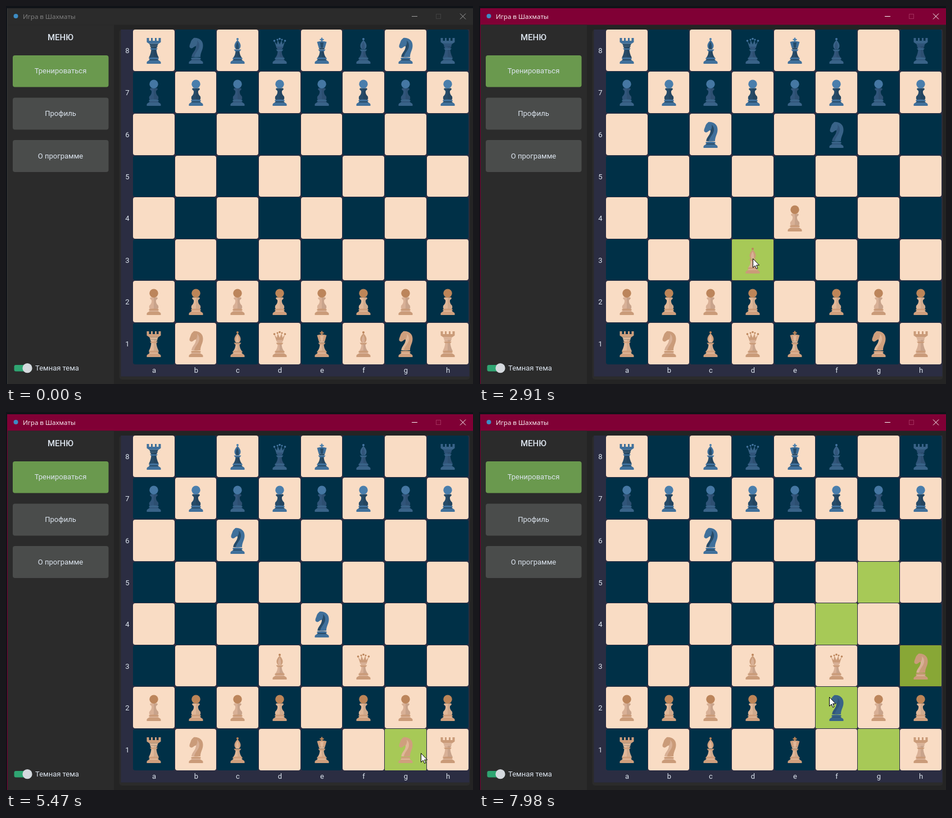
Write an HTML page that moves like this. It is 831 px wide and 674 px high and loops after 8000 ms.

```html
<!DOCTYPE html>
<html lang="ru">
<head>
<meta charset="utf-8">
<title>Игра в Шахматы</title>
<style>
html, body { margin: 0; width: 100%; height: 100%; overflow: hidden; background: #101318; }
svg { display: block; }
text { font: 13px Roboto, "Noto Sans", sans-serif; fill: #dce4ee; }
.mid { text-anchor: middle; }
.bar { fill: #2b2b2b; }
.edge { fill: #3c3c3c; }
.caption { font: 11.6px "Open Sans", "Noto Sans", sans-serif; fill: #858585; }
.ctl { fill: none; stroke: #a0a0a0; }
.max { fill: none; stroke: #414141; }
.active .bar, .active .edge { fill: #800035; }
.active .caption { fill: #fff; }
.active .ctl { stroke: #fff; }
.active .max { stroke: #a32f5c; }
.b { --a: #40709b; --h: #4a7eac; --s: #274b68; }
.b.dk { --a: #396388; --h: #4577a3; --s: #31557a; }
.w { --a: #ca9b79; --h: #bc855b; --s: #d8b096; }
.w.dk { --a: #cf9f7d; --h: #bd8558; --s: #e0b798; }
.a { fill: var(--a); }
.h { fill: var(--h); }
.s { fill: var(--s); }
</style>
</head>
<body>
<svg id="app" width="831" height="674" viewBox="0 0 831 674">
  <defs>
    <g id="foot">
      <path class="a" d="M11.5 47.5v-3q1-2 4-3h17q3 1 4 3v3z"/>
      <path class="s" d="M15 41.5l2-2h14l2 2z"/>
      <path class="a" d="M15.5 39.5v-2.5q8.500-2 17 0v2.500z"/>
    </g>
    <g id="stem">
      <path class="s" d="M20.500 24h7q0 8 4.500 13H16q4.500-5 4.500-13z"/>
      <path d="M24 24h3.500q0 8 4.500 13H24z" opacity=".07"/>
      <path class="a" d="M17.500 22h13l-2 3h-9z"/>
    </g>
    <g id="P">
      <path class="s" d="M18 16h12l1 2-3 3q-1 5 4 10 1 3-1 6H17q-2-3-1-6 5-5 4-10l-3-3z"/>
      <path d="M24 16h6l1 2-3 3q-1 5 4 10 1 3-1 6h-7z" opacity=".07"/>
      <use href="#foot"/>
      <circle class="h" cx="24" cy="8.800" r="7.700"/>
    </g>
    <g id="R">
      <path class="s" d="M17 16h14l-2.500 4q0 9 4.500 17H15q4.500-8 4.500-17z"/>
      <path d="M24 16h7l-2.500 4q0 9 4.500 17h-9z" opacity=".07"/>
      <path class="a" d="M11.500 1.500h4v5H19v-5h3v5h4v-5h3v5h3.500v-5h4V9L32 12H16l-4.500-3z"/>
      <path class="s" d="M16 12h16l-2 4H18z"/>
      <path class="a" d="M17 20h14l-2 2.500H19z"/>
      <use href="#foot"/>
    </g>
    <g id="N">
      <path class="a" d="M13 18.500C11.500 15 14 12 15 8 17 3.500 19 3 20 1.500c9-1 16 4 16.500 12.500C37 23 32 26 32 35.500H16.500C16.500 28 25 24 24 16c-3 0-5 4-8.500 4z"/>
      <path class="s" d="M26 6c5 4 5 11 2 16-3 5-6 8-7 13.500h-4.500C16.500 28 25 24 24 16c2-3 3-6 2-10z"/>
      <use href="#foot"/>
    </g>
    <g id="B">
      <circle class="h" cx="24" cy="3.500" r="2"/>
      <path class="a" d="M24 5c4 4 6 8 5.500 11.500-.5 2.500-1.500 3.500-2.500 5h-6c-1-1.500-2-2.500-2.500-5C18 13 20 9 24 5z"/>
      <path class="s" d="M24 8c2 4 3 9 2 13.500h-4c-2-4-1-9 2-13.500z"/>
      <use href="#stem"/><use href="#foot"/>
    </g>
    <g id="Q">
      <path class="a" d="M14.500 7l4.500 6 1.500-8 3.500 8 3.500-8 1.500 8 4.500-6-4 12.500h-11z"/>
      <path class="s" d="M18 17h12l-2 5h-8z"/>
      <g class="h">
        <circle cx="14.500" cy="6.500" r="1.800"/><circle cx="20" cy="4.500" r="1.500"/>
        <circle cx="24" cy="3" r="1.800"/><circle cx="28" cy="4.500" r="1.500"/><circle cx="33.500" cy="6.500" r="1.800"/>
      </g>
      <use href="#stem"/><use href="#foot"/>
    </g>
    <g id="K">
      <path class="h" d="M22.800 1h2.400v2.200h2.300v2.300h-2.300V9h-2.400V5.500h-2.300V3.200h2.300z"/>
      <path class="a" d="M15.500 8.500q8.500-3 17 0L29.500 19h-11z"/>
      <path class="s" d="M21 9.500h6l-1 9.500h-4z"/>
      <path class="s" d="M18.500 19h11L28 22h-8z"/>
      <use href="#stem"/><use href="#foot"/>
    </g>
  </defs>

  <rect width="831" height="674" fill="#101318"/>
  <rect class="edge" x="2" y="4" width="829" height="670"/>
  <rect x="3" y="33" width="828" height="641" fill="#242424"/>
  <rect class="bar" x="3" y="4" width="828" height="29.500"/>
  <circle cx="17.500" cy="18" r="4" fill="#3d8cc4"/>
  <text class="caption" x="30" y="22.500">Игра в Шахматы</text>
  <path class="ctl" d="M722 18.500h10"/>
  <rect class="max" x="765.500" y="14.500" width="8" height="8"/>
  <path class="ctl" d="M808 13.500l10 10m0-10l-10 10"/>

  <rect x="3" y="33.500" width="189" height="640.500" fill="#2b2b2b"/>
  <text class="mid" x="97" y="60.500" style="font-size:15px;font-weight:500">МЕНЮ</text>
  <rect x="12" y="88" width="170.500" height="56.500" rx="4" fill="#6a994e"/>
  <rect x="12" y="163.500" width="170.500" height="57" rx="4" fill="#4a4c4b"/>
  <rect x="12" y="239" width="170.500" height="57" rx="4" fill="#4a4c4b"/>
  <text class="mid" x="97" y="120">Тренироваться</text>
  <text class="mid" x="97" y="195.500">Профиль</text>
  <text class="mid" x="97" y="271.500">О программе</text>
  <rect x="14.500" y="640" width="31" height="11.500" rx="3" fill="#2fa572"/>
  <circle cx="38" cy="645.700" r="8.600" fill="#d5d9de"/>
  <text x="52" y="650">Темная тема</text>

  <rect x="201.500" y="42" width="624" height="624" rx="5" fill="#2b2b2b"/>
  <rect x="204.500" y="42" width="620" height="618.500" fill="#2b2d42"/>
  <g id="squares"></g>
  <g id="pieces"></g>
  <path id="cursor" fill="#fff" stroke="#000" stroke-linejoin="miter" d="M.5.5v16l3.700-3.500 2.400 5.600 2.400-1-2.400-5.500h5z"/>
</svg>
<script>
const LOOP = 8000;
const X = [226, 301, 375, 450, 525, 599, 674, 749, 824];
const Y = [42, 117, 192, 267, 341, 416, 490, 565, 640];
const FILES = "abcdefgh";
const LIGHT = "#f9dcc4", DARK = "#003047", HOVER = "#a7c957", PICKED = "#88a736";
const ACTIVATE = 500;

// time of the click, time of release, square, legal targets
const picks = [
  [500, 1150, "e2", "e3 e4"],
  [1780, 2650, "f1", "e2 d3 c4 b5 a6"],
  [3430, 3970, "d1", "e2 f3 g4 h5"],
  [5620, 6440, "g1", "e2 h3"],
  [7590, LOOP, "h3", "g5 f4 f2 g1"]
];
const moves = [
  [1150, "e2", "e4"], [1360, "b8", "c6"],
  [2650, "f1", "d3"], [2870, "g8", "f6"],
  [3970, "d1", "f3"], [4200, "f6", "e4"],
  [6440, "g1", "h3"], [6680, "e4", "f2"]
];
// pointer stops: time, x, y
const path = [
  [130, 604, 676], [450, 566, 528], [560, 566, 528], [930, 556, 376],
  [1020, 555, 374], [1200, 555, 374], [1740, 622, 612], [1830, 622, 612],
  [2080, 572, 527], [2500, 487, 450], [2900, 487, 450], [3340, 487, 602],
  [3500, 487, 602], [3800, 636, 453], [4370, 636, 453], [4970, 572, 602],
  [5320, 572, 602], [5470, 738, 608], [5700, 738, 608], [6360, 780, 454],
  [6700, 780, 454], [7050, 823, 452], [7380, 823, 452], [7540, 794, 456],
  [7630, 794, 456], [7980, 623, 508]
];

const $ = id => document.getElementById(id);
const app = $("app"), cursor = $("cursor"), pieceLayer = $("pieces");

function add(parent, tag, attrs, text) {
  const el = document.createElementNS("http://www.w3.org/2000/svg", tag);
  for (const k in attrs) el.setAttribute(k, attrs[k]);
  if (text) el.textContent = text;
  return parent.appendChild(el);
}
const col = sq => FILES.indexOf(sq[0]);
const row = sq => 8 - sq[1];
const isDark = sq => (col(sq) + row(sq)) % 2 === 1;

const squares = {}, start = {};
for (let r = 0; r < 8; r++) {
  add($("squares"), "text", { class: "mid", x: 216, y: Y[r] + 41.5 }, String(8 - r));
  add($("squares"), "text", { class: "mid", x: X[r] + 37.5, y: 654 }, FILES[r]);
  for (let c = 0; c < 8; c++) {
    const sq = FILES[c] + (8 - r);
    squares[sq] = add($("squares"), "rect", {
      x: X[c], y: Y[r], width: X[c + 1] - X[c] - 1, height: Y[r + 1] - Y[r] - 1
    });
    if (r < 2 || r > 5) {
      const kind = r === 1 || r === 6 ? "P" : "RNBQKBNR"[c];
      start[sq] = (r < 2 ? "b" : "w") + kind;
    }
  }
}

function pointer(t) {
  if (t < path[0][0]) return null;
  const i = path.findIndex(p => p[0] > t);
  if (i < 0) return path[path.length - 1].slice(1);
  const [t0, x0, y0] = path[i - 1], [t1, x1, y1] = path[i];
  const u = (t - t0) / (t1 - t0), e = u * u * (3 - 2 * u);
  return [x0 + (x1 - x0) * e, y0 + (y1 - y0) * e];
}

function squareAt(p) {
  if (!p) return "";
  const c = X.findIndex((x, i) => p[0] >= x && p[0] < X[i + 1]);
  const r = Y.findIndex((y, i) => p[1] >= y && p[1] < Y[i + 1]);
  return c < 0 || r < 0 ? "" : FILES[c] + (8 - r);
}

function place(count) {
  const board = { ...start };
  for (const [, from, to] of moves.slice(0, count)) {
    board[to] = board[from];
    delete board[from];
  }
  pieceLayer.replaceChildren();
  for (const sq in board) {
    add(pieceLayer, "use", {
      href: "#" + board[sq][1],
      class: board[sq][0] + (isDark(sq) ? " dk" : ""),
      x: X[col(sq)] + 13, y: Y[row(sq)] + 13.5
    });
  }
}

let shown = -1;
function draw(t) {
  app.classList.toggle("active", t >= ACTIVATE);
  const count = moves.filter(m => m[0] <= t).length;
  if (count !== shown) place(shown = count);

  const p = pointer(t), over = squareAt(p);
  const pick = picks.find(k => t >= k[0] && t < k[1]);
  for (const sq in squares) {
    let fill = isDark(sq) ? DARK : LIGHT;
    if (pick && pick[2] === sq) fill = PICKED;
    if (sq === over || (pick && pick[3].includes(sq))) fill = HOVER;
    const lit = fill === HOVER || fill === PICKED;
    squares[sq].setAttribute("fill", fill);
    squares[sq].setAttribute("rx", lit ? 1.5 : 4);
  }
  cursor.style.display = p ? "" : "none";
  if (p) cursor.setAttribute("transform", `translate(${Math.round(p[0])} ${Math.round(p[1])})`);
}

const begin = performance.now();
function tick() {
  draw((performance.now() - begin) % LOOP);
  requestAnimationFrame(tick);
}
tick();
</script>
</body>
</html>
```
